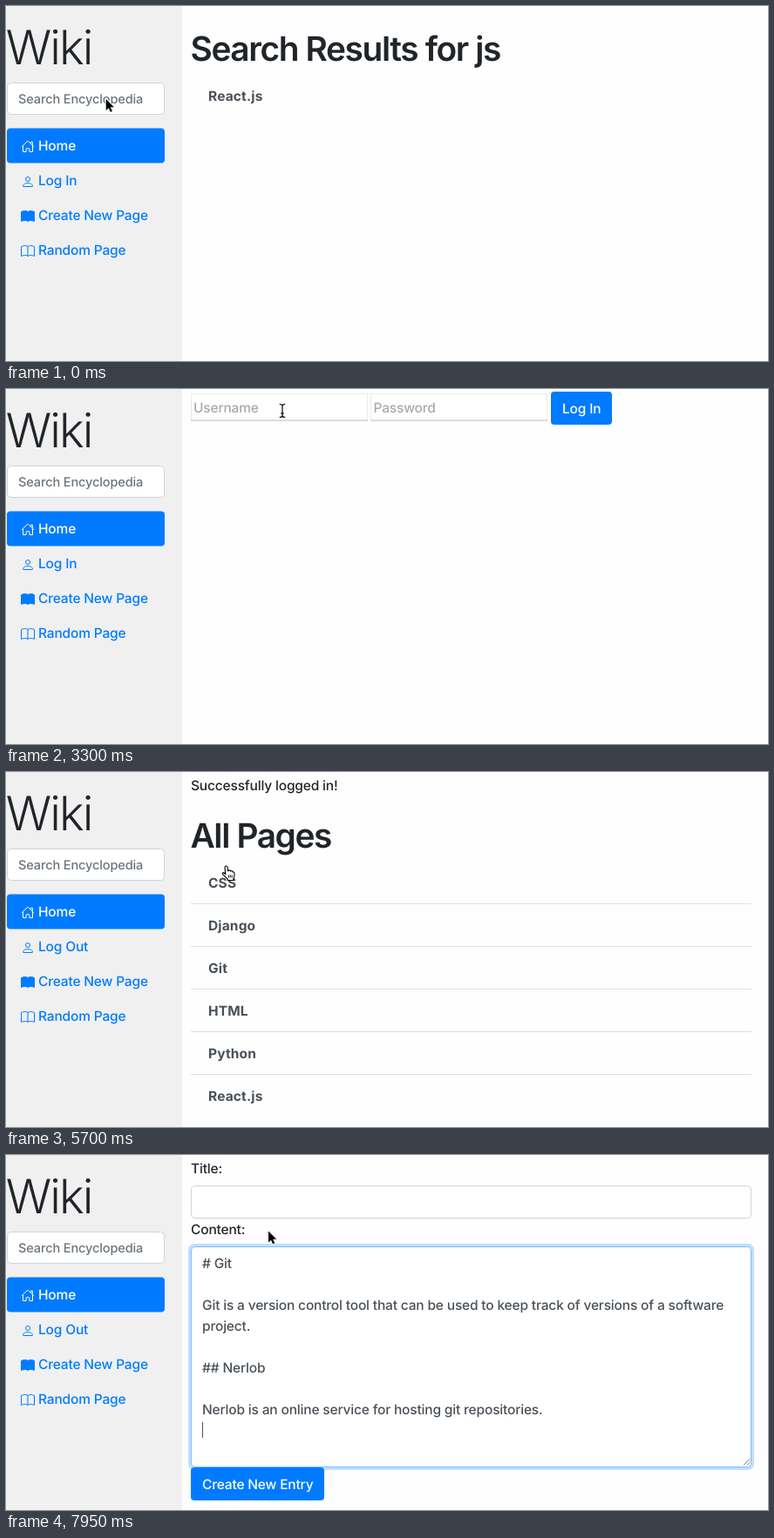
Write an HTML page that moves like this. It is 874 by 408 pixels and loops after 8 s.

```html
<!DOCTYPE html>
<html lang="en">
<head>
<meta charset="utf-8">
<title>Wiki</title>
<style>
  html, body { margin: 0; width: 100%; height: 100%; overflow: hidden; background: #fefefe; }
  svg { display: block; }
  text {
    font: 450 15.5px Inter, "Liberation Sans", sans-serif;
    font-optical-sizing: none;
    letter-spacing: -.011em;
    text-rendering: geometricPrecision;
    white-space: pre;
    fill: #212529;
  }
  .brand { font-size: 54.3px; font-weight: 300; letter-spacing: -.036em; }
  .title { font-size: 38.8px; font-weight: 560; letter-spacing: -.035em; }
  .item { font-weight: 700; letter-spacing: .01em; fill: #495057; }
  .search { font-size: 14.6px; fill: #6c757d; }
  .hint { fill: #a9a9a9; }
  .body { fill: #495057; }
  .light { fill: #fff; }
  .filled { fill: #000; }
  .link { color: #007bff; }
  .link.hover { color: #0056b3; }
  .link text { fill: currentColor; }
  .link.active { color: #fff; }
  .icon { fill: none; stroke: currentColor; }
  .icon.solid { fill: currentColor; }
</style>
</head>
<body>
<svg id="stage" width="874" height="408" viewBox="0 0 874 408"></svg>
<script>
const LOOP = 8000, STEP = 150;

const text = (x, y, str, cls = '') => `<text x="${x}" y="${y}" class="${cls}">${str}</text>`;
const rect = (x, y, w, h, attrs) => `<rect x="${x}" y="${y}" width="${w}" height="${h}" ${attrs}/>`;
const path = (d, attrs = '') => `<path d="${d}" ${attrs}/>`;
const group = (id, body) => `<g id="${id}">${body}</g>`;

const BLUE = 'rx="4" fill="#007bff"';
const BOX = 'rx="4" fill="#fff" stroke="#ced4da"';

const ICONS = {
  home: 'M2.5 7V13.5H6.1V10.2Q6.1 9.7 6.6 9.7H9.4Q9.9 9.7 9.9 10.2V13.5H13.5V7M1.2 7.7L7.5 1.4Q8 1 8.5 1.4L14.8 7.7M11.7 3.9V2.2H13.4V5.9',
  person: 'M8 2.5a2.5 2.5 0 1 1 0 5a2.5 2.5 0 1 1 0-5M2.5 13Q2.5 13.5 3 13.5H13Q13.5 13.5 13.5 13C13.5 12 12.3 9.5 8 9.5S2.5 12 2.5 13Z',
  book: 'M8 2.5C6.2 .9 3.2 1.3 .5 2.5V13.4C3.2 12.3 6.2 12 8 13.4C9.8 12 12.8 12.3 15.5 13.4V2.5C12.8 1.3 9.8 .9 8 2.5V13.4'
};

const link = (id, y, icon, label, cls = '', solid = '') =>
  `<g id="${id}" class="link ${cls}">${path(ICONS[icon], `class="icon ${solid}" transform="translate(17 ${y - 12.4})"`)}` +
  text(37, y, label) + '</g>';

const sidebar =
  rect(0, 0, 202, 408, 'fill="#f0f0f0"') +
  text(-.2, 67, 'Wiki', 'brand') +
  rect(1.5, 88.5, 180, 36, BOX) +
  text(14, 112.3, 'Search Encyclopedia', 'search') +
  rect(1, 140.5, 181, 40, BLUE) +
  link('home', 166.4, 'home', 'Home', 'active') +
  link('login', 206.4, 'person', 'Log In') +
  link('logout', 206.4, 'person', 'Log Out') +
  link('create', 246.4, 'book', 'Create New Page', '', 'solid') +
  link('random', 286.4, 'book', 'Random Page');

const PAGES = ['CSS', 'Django', 'Git', 'HTML', 'Python', 'React.js'];
const pageList = top => text(211.5, top + 62.5, 'All Pages', 'title') +
  PAGES.map((name, i) =>
    (i ? rect(212, top + 78 + 49 * i, 643, 1, 'fill="#dfdfdf"') : '') +
    text(232, top + 108.8 + 49 * i, name, 'item')).join('');

const field = (x, fill) =>
  rect(x + .5, 5.5, 202, 31, `fill="${fill}" stroke="#ebebeb"`) +
  rect(x, 35.5, 203, 1, 'fill="#c6c6c6"');
const ring = x => rect(x, 4.5, 204.5, 33, 'rx="1.5" fill="none" stroke="#85abec" stroke-width="3"');

const dots = Array.from({ length: 9 }, (_, i) =>
  `<circle cx="${426.4 + 9.75 * i}" cy="21.2" r="3.9"/>`).join('');

const loginForm =
  group('empty', field(212, '#fff') + field(418, '#fff') +
    text(215, 27, 'Username', 'hint') + text(421.5, 27, 'Password', 'hint')) +
  group('userFocus', ring(211.5)) +
  group('userCaret', rect(215, 12, 1, 18, 'fill="#000"')) +
  group('autofill', field(212, '#faffbd') + field(418, '#faffbd') +
    text(215, 27, 'pelun', 'filled') +
    rect(421, 12, 89, 18, 'fill="#b0d7dc"') + dots + ring(417.5) +
    '<circle cx="603" cy="18.4" r="3.5"/>' + path('M602 20H604V26L603 27.3L602 26Z') +
    path('M609 19.5L612.3 22.8L615.6 19.5', 'fill="none" stroke="#000" stroke-width="1.4"')) +
  rect(625, 3, 70, 38, BLUE) + text(638, 27.8, 'Log In', 'light');

const ENTRY = ['# Git', '', 'Git is a version control tool that can be used to keep track of versions of a software',
  'project.', '', '## Nerlob', '', 'Nerlob is an online service for hosting git repositories.'];

const entryForm =
  text(212, 21, 'Title:') + rect(212.5, 35.5, 642, 37, BOX) +
  text(212, 91, 'Content:') + rect(212.5, 105.5, 642, 253, BOX) +
  group('entryFocus',
    rect(210.5, 103.5, 646, 257, 'rx="5.5" fill="none" stroke="#bfdeff" stroke-width="3"') +
    rect(212.5, 105.5, 642, 253, 'rx="4" fill="#fff" stroke="#80bdff"')) +
  path('M846 356.5L853 349.5M850 356.5L853 353.5', 'stroke="#6b6b6b" fill="none"') +
  group('entryCaret', rect(225, 0, 1, 18, 'fill="#495057"')) +
  group('entryText', ENTRY.map((line, i) => text(225, 130 + 24 * i, line, 'body')).join('')) +
  rect(212, 359, 153, 38, BLUE) + text(225, 383.8, 'Create New Entry', 'light');

const BEAM = 'M-3.3-7.5Q0-7.5 0-5.5V5.5Q0 7.5-3.3 7.5M3.3-7.5Q0-7.5 0-5.5M0 5.5Q0 7.5 3.3 7.5M-2 3H2';
const cursors =
  group('arrow', path('M0 0V13L3 10.2L5 14.8L7.2 13.9L5.2 9.3H9.2Z',
    'stroke="#fff" stroke-width="2" paint-order="stroke" stroke-linejoin="round"')) +
  group('hand', `<g transform="translate(-5.5 -1)">` +
    path('M4.3 10.8L3.5 2.9Q3.5 1 5 1Q6.3 1 6.6 2.7L7.2 6.9Q7.4 5.9 8.5 5.9Q9.7 5.9 9.9 7.2Q10.3 6.4 11.2 6.5Q12.3 6.6 12.5 7.9Q14.4 7.5 14.4 9.4V12.6Q14.4 14 13.4 15.5V17.5H6.8V16Q4.6 14.4 1.2 10.7Q.2 9.2 1.4 8.7Q2.6 8.4 4.3 10.8Z',
      'fill="#fff" stroke="#000" stroke-width="1.1" stroke-linejoin="round"') +
    path('M7.9 11.3V14.5M9.8 11.3V14.5M11.7 11.3V14.5', 'stroke="#000" stroke-width=".9"') + '</g>') +
  group('beam', path(BEAM, 'fill="none" stroke="#fff" stroke-width="3"') +
    path(BEAM, 'fill="none" stroke="#000" stroke-width="1.2"'));

document.getElementById('stage').innerHTML = sidebar +
  group('results', text(211.5, 62.5, 'Search Results for js', 'title') + text(232, 108.8, 'React.js', 'item')) +
  group('allPages', pageList(0)) +
  group('loginForm', loginForm) +
  group('welcome', text(212, 21, 'Successfully logged in!') + pageList(24)) +
  group('entryForm', entryForm) +
  group('cursor', cursors);

// Pointer stops: time, x, y; positions ease between them.
const STOPS = [
  [0, 114.7, 107], [150, 119, 108], [450, 144, 150], [1050, 74.5, 167], [1650, 74.5, 167],
  [1950, 96, 190], [2100, 85.5, 200], [2700, 85.5, 200], [3300, 317, 25], [5550, 317, 25],
  [5700, 253, 108], [6000, 96, 230], [6150, 90.2, 236], [6750, 90.2, 236],
  [7350, 301, 113], [7800, 301, 113], [7950, 301, 87.5]
];
const SHAPES = [
  [0, 'arrow'], [150, 'beam'], [300, 'arrow'], [450, 'hand'], [1200, 'arrow'], [1800, 'hand'],
  [2400, 'arrow'], [3300, 'beam'], [4500, 'arrow'], [5700, 'hand'], [5850, 'arrow'], [6000, 'hand'],
  [6750, 'arrow'], [7350, 'beam'], [7950, 'arrow']
];
const SCREENS = [[0, 'results'], [1200, 'allPages'], [2400, 'loginForm'], [4650, 'welcome'], [6600, 'entryForm']];

const el = id => document.getElementById(id);
const show = (id, on) => { el(id).style.display = on ? '' : 'none'; };
const current = (list, t) => list.filter(k => k[0] <= t).pop();
const pick = (list, t) => {
  const active = current(list, t)[1];
  new Set(list.map(k => k[1])).forEach(id => show(id, id === active));
};

function pointer(t) {
  const a = current(STOPS, t), b = STOPS[STOPS.indexOf(a) + 1] || a;
  const p = a === b ? 0 : (t - a[0]) / (b[0] - a[0]);
  const e = p * p * (3 - 2 * p);
  return [a[1] + (b[1] - a[1]) * e, a[2] + (b[2] - a[2]) * e];
}

function draw(now) {
  const t = Math.floor(now % LOOP / STEP) * STEP;
  const during = (from, to = LOOP) => t >= from && t < to;

  pick(SCREENS, t);
  pick(SHAPES, t);
  el('cursor').setAttribute('transform', `translate(${pointer(t)})`);

  show('login', t < 4650);
  show('logout', t >= 4650);
  el('login').classList.toggle('hover', during(1950, 2400));
  el('create').classList.toggle('hover', during(6000, 6750));

  show('empty', t < 4500);
  show('userFocus', during(3450, 4500));
  show('userCaret', during(3450, 3900) || during(4350, 4500));
  show('autofill', during(4500));

  show('entryFocus', during(7500));
  show('entryCaret', during(7500));
  show('entryText', during(7800));
  el('entryCaret').setAttribute('transform', `translate(0 ${t < 7800 ? 115 : 307})`);
}

function tick() {
  draw(performance.now());
  requestAnimationFrame(tick);
}
tick();
</script>
</body>
</html>
```
